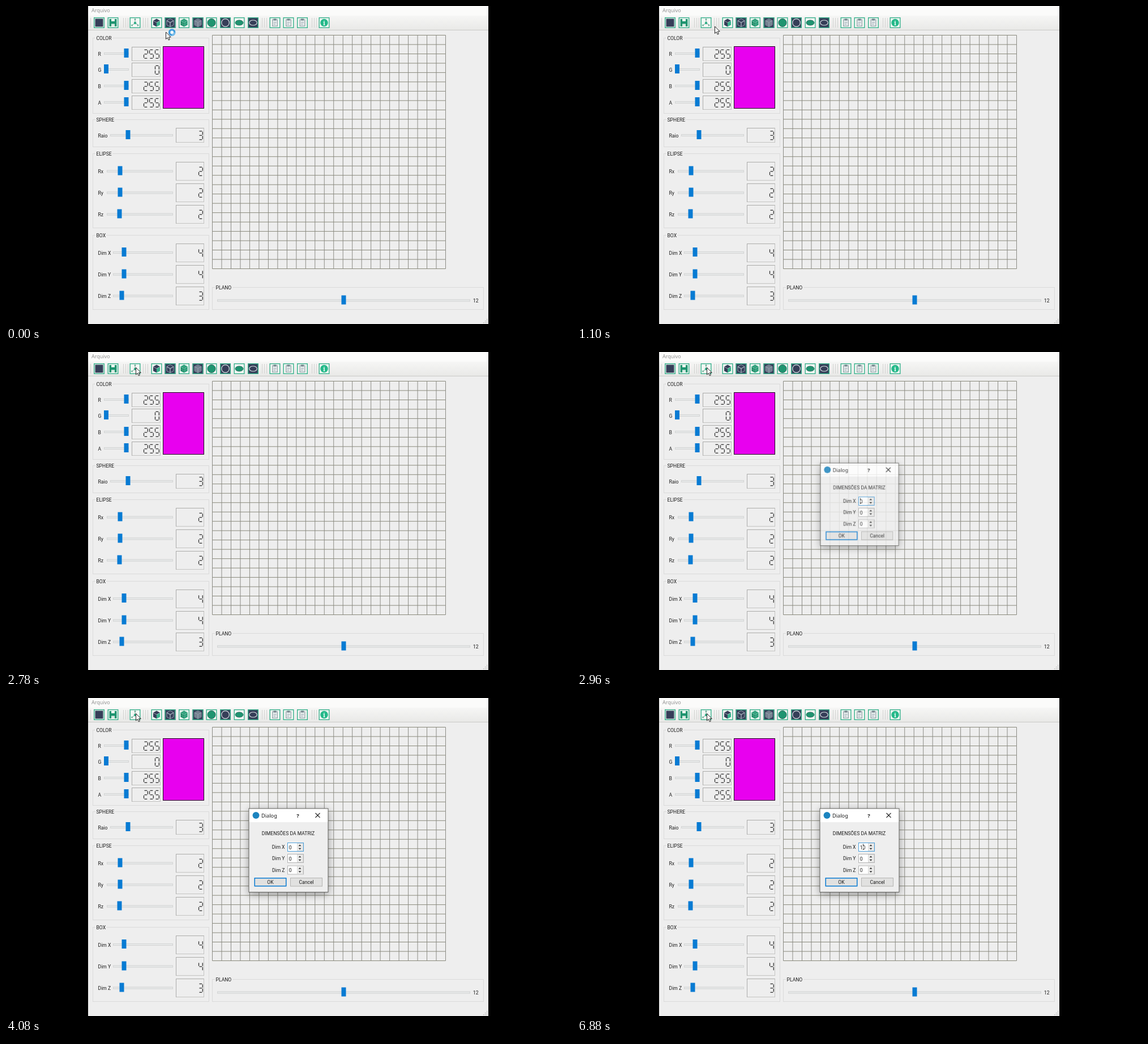
An HTML page with a canvas that plays this animation: 998 px wide and 561 px high, repeating every 8 s.

```html
<!DOCTYPE html>
<html lang="pt">
<head>
<meta charset="utf-8">
<style>
  html, body { margin: 0; width: 100%; height: 100%; overflow: hidden; background: #000; }
  canvas { position: absolute; left: 0; top: 0; }
  #dialog { transform-origin: 499px 269px; }
</style>
</head>
<body>
<canvas id="main" width="998" height="561"></canvas>
<canvas id="dialog" width="998" height="561"></canvas>
<script>
const LOOP = 8000;
const UI = '8.6px Roboto, sans-serif';
const TITLE = '9.2px "Noto Sans", sans-serif';
const GREEN = '#1f9470', TEAL = '#38b08c', NAVY = '#363e58', BLUE = '#087bd3', FACE = '#eeeeee';
const dialog = document.getElementById('dialog');
const mainCtx = document.getElementById('main').getContext('2d');
const dialogCtx = dialog.getContext('2d');
let c = mainCtx;

function box(x, y, w, h, fill, stroke, lw = 1) {
  if (fill) { c.fillStyle = fill; c.fillRect(x, y, w, h); }
  if (stroke) {
    c.strokeStyle = stroke;
    c.lineWidth = lw;
    c.strokeRect(x + lw / 2, y + lw / 2, w - lw, h - lw);
  }
}

// Each path is a flat list x0, y0, x1, y1, ...
function line(points, stroke, lw = 1, fill) {
  c.beginPath();
  for (let i = 0; i < points.length; i += 2) c.lineTo(points[i], points[i + 1]);
  if (fill) { c.closePath(); c.fillStyle = fill; c.fill(); }
  if (stroke) { c.strokeStyle = stroke; c.lineWidth = lw; c.stroke(); }
}

function oval(x, y, rx, ry, fill, stroke, lw = 1) {
  c.beginPath();
  c.ellipse(x, y, rx, ry, 0, 0, 7);
  if (fill) { c.fillStyle = fill; c.fill(); }
  if (stroke) { c.strokeStyle = stroke; c.lineWidth = lw; c.stroke(); }
}

function text(s, x, y, font = UI, color = '#1c1c1c', align = 'left') {
  c.font = font;
  c.fillStyle = color;
  c.textAlign = align;
  c.fillText(s, x, y);
}

function group(title, x, y, w, h) {
  box(x, y, w, h, null, '#dadada');
  c.font = UI;
  box(x + 5, y - 3, c.measureText(title).width + 3, 7, FACE);
  text(title, x + 6.5, y + 4);
}

function slider(x1, x2, y, knob) {
  box(x1, y - 1, x2 - x1, 4, '#e7e9e9', '#d3d4d4');
  box(knob - 4, y - 8, 8, 16, BLUE);
}

const SEGMENTS = { 0: 'abcdef', 2: 'abged', 3: 'abgcd', 4: 'fgbc', 5: 'afgcd' };

function digit(n, x, y) {
  const w = 6.8, h = 15, m = h / 2, g = 1;
  const ends = {
    a: [g, 0, w - g, 0], g: [g, m, w - g, m], d: [g, h, w - g, h],
    b: [w, g, w, m - g], c: [w, m + g, w, h - g],
    e: [0, m + g, 0, h - g], f: [0, g, 0, m - g]
  };
  for (const s of SEGMENTS[n]) line(ends[s].map((v, i) => v + (i % 2 ? y : x)), '#333', 1.3);
}

function lcd(value, x, y, w, h) {
  box(x, y, w, h, null, '#acacaa');
  line([x + 1, y + h - .5, x + w - .5, y + h - .5, x + w - .5, y + 1], '#c4c4c2');
  [...String(value)].reverse().forEach((n, i) => digit(n, x + w - 9.5 - i * 10, y + (h - 15) / 2 + .3));
}

function row(label, y, trackStart, knob, value, tall = true) {
  text(label, 162.5, y + 4.5);
  slider(trackStart, 295, y, knob);
  const h = tall ? 33 : 26;
  lcd(value, 300, Math.round(y + 1.2 - h / 2), 50, h);
}

function cube(x, stroke, top, left, right, cells = 1) {
  const y = 29.5, a = 6, d = 3.2;
  if (top) {
    line([x, y - 7, x + a, y - 7 + d, x, y - 7 + 2 * d, x - a, y - 7 + d], null, 1, top);
    line([x - a, y - d, x, y, x, y + 7, x - a, y + 4], null, 1, left);
    line([x + a, y - d, x, y, x, y + 7, x + a, y + 4], null, 1, right);
  }
  if (!stroke) return;
  for (let i = 0; i <= cells; i++) {
    const k = i / cells, s = a * k, v = 7 * k;
    for (const q of [-1, 1]) {
      line([x + q * s, y - .4 - d * k, x + q * s, y + 7 - d * k], stroke, .7);
      line([x, y + v, x + q * a, y - d + v], stroke, .7);
      line([x + q * s, y - 7 + d * k, x + q * (s - a), y - 7 + d * (k + 1)], stroke, .7);
    }
  }
}

function frame(x, dark) {
  box(x - 9.5, 20, 19, 19, dark ? NAVY : '#f4f7f4', TEAL, 1.4);
}

function clipboard(x) {
  frame(x);
  box(x - 5, 23.5, 10, 12.5, '#e6ebec', '#94a3a9', 1.2);
  box(x - 2.5, 22.5, 5, 3, '#71828a');
  line([x - 2.5, 29, x + 2.5, 29], '#94a5ad');
  line([x - 2.5, 32, x + 1, 32], '#94a5ad');
}

function icons() {
  frame(164.5);
  box(157.5, 22.5, 14, 14, NAVY);
  frame(189);
  box(182.5, 23, 13, 13, GREEN);
  box(186, 23, 6, 4, '#e9f3ee');
  box(186, 31.5, 6, 4.5, '#d8eae2');
  frame(228);
  line([228, 23, 228, 30, 233, 33], '#7fa99d');
  line([228, 30, 222.5, 34], '#7fa99d');
  box(226, 28, 4, 4, TEAL);
  for (const [x, y] of [[228, 23.5], [233, 34], [222.5, 34]]) oval(x, y, 1.5, 1.5, '#6fae99');
  frame(266);
  cube(266, null, NAVY, NAVY, TEAL);
  frame(290, true);
  cube(290, '#b8c6ce');
  frame(314.5);
  cube(314.5, '#58b897', GREEN, '#16815f', GREEN, 2);
  frame(339, true);
  cube(339, '#aebbc3', null, null, null, 3);
  frame(363);
  oval(363, 29.5, 7, 7, GREEN, '#2c6a5e');
  frame(387.5, true);
  oval(387.5, 29.5, 6.8, 6.8, null, '#d7e0e3', 1.2);
  frame(412);
  oval(412, 29.5, 7, 4.5, GREEN, '#2c6a5e');
  frame(436.5, true);
  oval(436.5, 29.5, 6.8, 4.5, null, '#d7e0e3', 1.2);
  [475, 499, 523.5].forEach(clipboard);
  frame(562);
  oval(562, 29.5, 6.8, 6.8, '#25b98a');
  text('i', 562, 33.5, 'bold 10px "Noto Serif", serif', '#fff', 'center');
}

function grid() {
  const x = 364.5, y = 51.5, size = 412;
  for (let i = 0; i <= 25; i++) {
    const p = i * size / 25;
    line([x + p, y, x + p, y + size], '#8c8c86');
    line([x, y + p, x + size, y + p], '#88887a');
  }
}

function drawWindow() {
  box(0, 0, 998, 561, '#000');
  box(145, 0, 707, 561, FACE);
  box(145, 0, 707, 17, '#fbfbfa');
  text('Arquivo', 151, 11, '9px "Noto Sans", sans-serif', '#929292');
  const shade = c.createLinearGradient(0, 17, 0, 42);
  shade.addColorStop(0, '#f6f6f5');
  shade.addColorStop(1, '#e9e9e7');
  box(145, 17, 707, 25, shade);
  box(145, 42, 707, 1, '#c9c9c7');
  for (const x of [149, 207, 211, 215, 242, 246, 250, 452, 456, 460, 540, 544, 548]) box(x, 21, 1, 17, '#d3d3d1');
  icons();

  group('COLOR', 153, 56, 206, 134);
  ['R', 'G', 'B', 'A'].forEach((name, i) => {
    const y = Math.round(82.5 + i * 28.7), off = name === 'G';
    text(name, 162.5, y + 4.5);
    slider(173, 217, y, off ? 177 : 212.5);
    lcd(off ? 0 : 255, 222, y - 11, 51, 25);
  });
  box(277, 71, 73, 110, '#e800ef', '#1c001c');

  group('SPHERE', 153, 200, 206, 49);
  row('Raio', 227, 184, 215.5, 3, false);
  group('ELIPSE', 153, 260, 206, 132);
  row('Rx', 290.5, 178, 201.5, 2);
  row('Ry', 328.5, 178, 201.5, 2);
  row('Rz', 366.5, 178, 200.5, 2);
  group('BOX', 153, 404, 206, 132);
  row('Dim X', 434, 189, 208.5, 4);
  row('Dim Y', 472.5, 189, 208.5, 4);
  row('Dim Z', 510.5, 189, 204.5, 3);
  group('PLANO', 364, 496, 480, 40);
  slider(373, 820, 518.5, 596.5);
  text('12', 825, 523);
  grid();
  for (let i = 0; i < 3; i++)
    for (let j = 0; j <= i; j++) box(849 - j * 3, 552 + i * 3, 1.5, 1.5, '#bdbdbb');
}

function spinBox(label, y, value, focused) {
  text(label, 492.5, y + 11, UI, '#1c1c1c', 'right');
  box(497, y, 29, 16, '#fff', focused ? '#4a9fdc' : '#b4b4b4');
  box(514, y + 1, 11, 14, '#ececeb', '#d0d0d0', .7);
  line([516.5, y + 6.3, 519, y + 3.5, 521.5, y + 6.3], null, 1, '#333');
  line([516.5, y + 9.7, 519, y + 12.5, 521.5, y + 9.7], null, 1, '#333');
  text(value, 499.7, y + 11.5);
}

// The caret inverts whatever lies under it.
function caret(x) {
  c.globalCompositeOperation = 'difference';
  box(x, 257.5, 1, 10.5, '#ddd');
  c.globalCompositeOperation = 'source-over';
}

function button(label, x, w, stroke, lw) {
  box(x, 317, w, 15.5, '#e1e1e0', stroke, lw);
  text(label, x + w / 2, 328, UI, '#1c1c1c', 'center');
}

function drawDialog(t) {
  c.clearRect(0, 0, 998, 561);
  c.save();
  c.shadowColor = 'rgba(0,0,0,.4)';
  c.shadowBlur = 13;
  c.shadowOffsetY = 3;
  box(429, 195, 140, 148, FACE);
  c.restore();
  box(429, 195, 140, 24, '#fff');
  box(428.5, 194.5, 141, 148.5, null, '#62625f');
  oval(441.5, 207, 6, 6, '#1c84bf');
  text('Dialog', 451, 210.5, TITLE);
  text('?', 515.5, 210.5, 'bold 9.5px "Noto Sans", sans-serif', '#222', 'center');
  line([546.5, 203, 554.5, 211], '#222', 1.1);
  line([554.5, 203, 546.5, 211], '#222', 1.1);
  text('DIMENSÕES DA MATRIZ', 498.5, 242, UI, '#1c1c1c', 'center');

  const typed = t >= 6740;
  spinBox('Dim X', 255, typed ? '10' : '0', true);
  spinBox('Dim Y', 275, '0');
  spinBox('Dim Z', 295.5, '0');
  if (typed) caret(505);
  else if (t < 4080) caret(500);
  button('OK', 438.5, 57, BLUE, 1.5);
  button('Cancel', 502, 57, '#b4b4b2', 1);
}

// Pointer stops: time, x, y
const PATH = [[0, 282.5, 46], [260, 273, 44], [1100, 243.5, 36], [1540, 229.5, 27.5], [LOOP, 229.5, 27.5]];

function drawPointer(t) {
  const i = PATH.findIndex(p => p[0] > t);
  const [t0, x0, y0] = PATH[i - 1], [t1, x1, y1] = PATH[i];
  const k = (t - t0) / (t1 - t0);
  const x = x0 + (x1 - x0) * k, y = y0 + (y1 - y0) * k;
  const arrow = [0, 0, 0, 12.5, 2.8, 9.8, 4.8, 14.2, 6.8, 13.3, 4.9, 9, 8.8, 9];
  line([...arrow, 0, 0].map((v, j) => v + (j % 2 ? y : x)), '#222', 1, '#fff');
  if (t < 840) {
    const a = t / 160;
    oval(x + 10.7, y + .5, 4.6, 4.6, '#eef6fb', '#3f9bdb', 3.4);
    c.beginPath();
    c.arc(x + 10.7, y + .5, 4.6, a, a + 1.6);
    c.strokeStyle = '#7cc0ec';
    c.lineWidth = 2.6;
    c.stroke();
  }
}

function render(now) {
  const t = now % LOOP;
  c = mainCtx;
  drawWindow();
  drawPointer(t);
  const p = Math.min(1, Math.max(0, (t - 2890) / 160));
  const ease = 1 - (1 - p) ** 3;
  dialog.style.opacity = ease;
  dialog.style.transform = p < 1 ? `scale(${.93 + .07 * ease})` : 'none';
  if (p > 0) {
    c = dialogCtx;
    drawDialog(t);
  }
}

const start = performance.now();
function tick() {
  render(performance.now() - start);
  requestAnimationFrame(tick);
}
tick();
</script>
</body>
</html>
```
